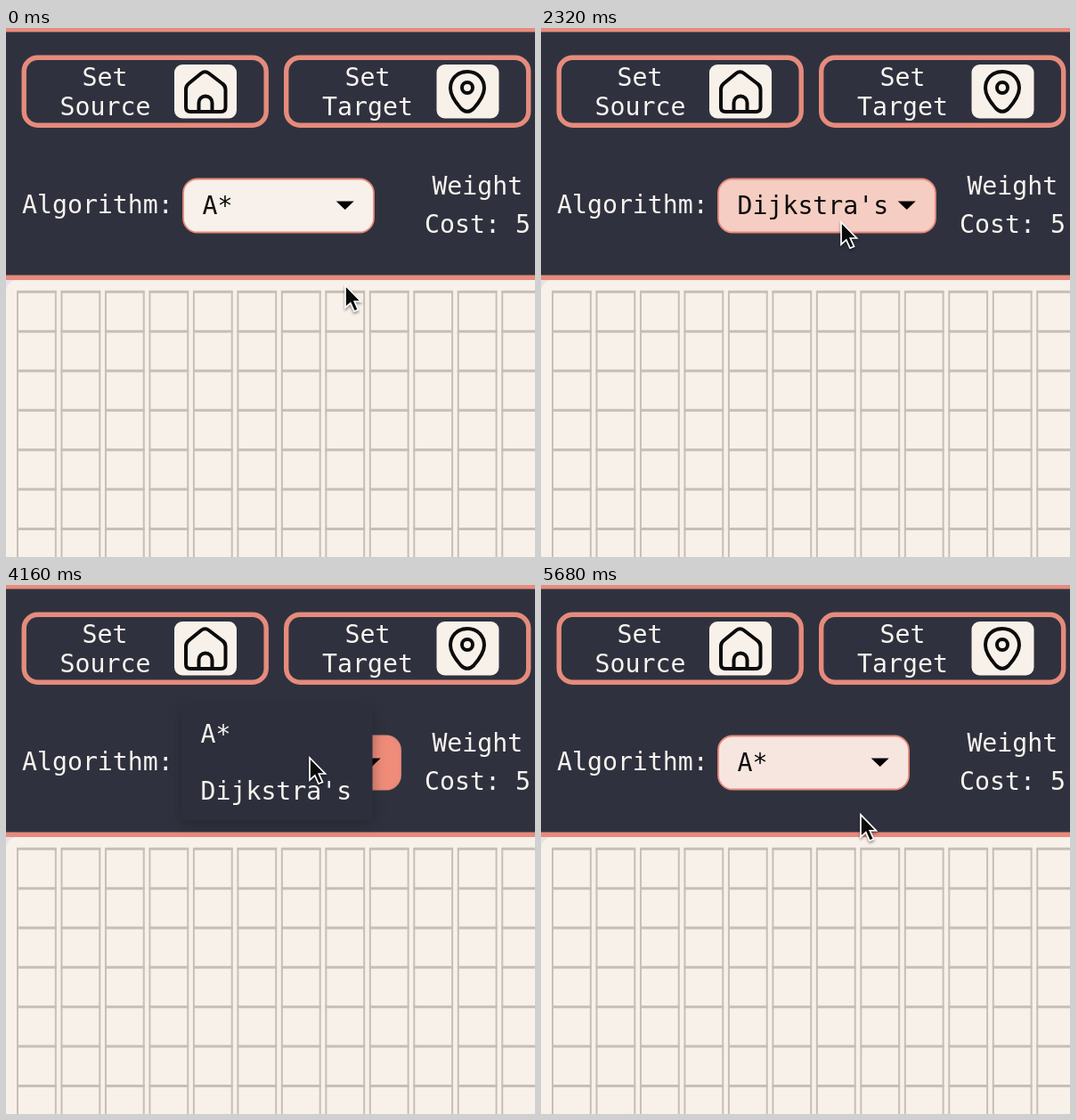
Animation, 594 px wide and 594 px high, one loop 5760 ms. Source, as an HTML page:

```html
<!DOCTYPE html>
<html lang="en">
<head>
<meta charset="utf-8">
<title>Algorithm picker</title>
<style>
  html, body { margin: 0; width: 100%; height: 100%; overflow: hidden; background: #2f323e; }
  svg { display: block; width: 100vw; height: 100vh; }
  text { font: 28.2px "DejaVu Sans Mono", monospace; fill: #f8f3ef; white-space: pre; }
  .middle { text-anchor: middle; }
  .button { fill: none; stroke: #e68b7c; stroke-width: 5.4; }
  .icon { fill: none; stroke: #0b0b0b; stroke-width: 4; stroke-linejoin: round; stroke-linecap: round; }
  .cream { fill: #f8f1ea; }
  .line { fill: #e88b7c; }
  #menu { filter: drop-shadow(0 4px 7px rgba(20, 22, 32, .4)); }
  #cursor { filter: drop-shadow(0 2px 1.5px rgba(0, 0, 0, .4)); }
</style>
</head>
<body>
<svg viewBox="0 0 594 594">
  <defs>
    <g id="frame">
      <rect class="button" x="20.2" y="33.2" width="272" height="76" rx="15.5"/>
      <rect class="cream" x="189" y="41" width="70" height="60.5" rx="9"/>
    </g>
  </defs>
  <rect width="594" height="594" fill="#2f323e"/>
  <rect class="line" width="594" height="4.5"/>
  <rect class="line" y="277.5" width="594" height="6"/>

  <use href="#frame"/>
  <text class="middle" x="111" y="64.5">Set</text>
  <text class="middle" x="111.5" y="98">Source</text>
  <path class="icon" d="M202 89V69q0-4 3-6.5L219 51q4.500-3.500 9 0L243 62.500q3.500 2.500 3.500 6.500V89q0 5-5 5H207q-5 0-5-5Z M216.500 94V84a7.500 7.500 0 0 1 15 0V94"/>

  <use href="#frame" x="294.5"/>
  <text class="middle" x="406" y="64.5">Set</text>
  <text class="middle" x="406" y="98">Target</text>
  <path class="icon" d="M518 49C506 49 499 58 499 67.5C499 77 507 86 511 90.500Q518 97 525 90.500C529 86 537 77 537 67.500C537 58 530 49 518 49Z"/>
  <circle class="icon" cx="518" cy="67" r="6"/>

  <text x="18" y="207.5">Algorithm:</text>
  <text class="middle" x="529.3" y="187">Weight</text>
  <text class="middle" x="529.5" y="229.5">Cost: 5</text>

  <rect y="283" width="20" height="20" fill="#e6e2ea"/>
  <rect class="cream" y="283" width="620" height="330" rx="13"/>
  <path id="verticals" stroke="#c6beb7" stroke-width="2"/>
  <path id="horizontals" stroke="#c6beb7" stroke-width="3"/>

  <rect id="select" x="199" y="169.5" height="60" rx="16" stroke="#e6897b" stroke-width="1.8"/>
  <text id="value" x="220.5" y="208.5" style="fill:#0b0b0b"></text>
  <path id="caret" d="M-43.3 194.500h20l-10 9.500Z"/>

  <g id="menu">
    <rect x="197" y="135" width="214.5" height="129" fill="#2d303c"/>
    <rect id="highlight" x="197" width="214.5" height="64.5" fill="#f08b79"/>
    <text x="218.5" y="176.5">A*</text>
    <text x="218.5" y="240.5">Dijkstra's</text>
  </g>
  <path id="cursor" d="M1 2V27L6.800 21.800L11 31.200L15.500 29.300L11.300 20H18.500Z" fill="#0b0b0b" stroke="#fff" stroke-width="1.7"/>
</svg>
<script>
const LOOP = 5760, STEP = 80, FADE = 400, HOVER_DELAY = 400;
const CREAM = [248, 240, 234], SALMON = [239, 139, 121];
const ROW_SPLIT = 199.5;
const $ = id => document.getElementById(id);
const clamp = v => Math.min(1, Math.max(0, v));

const easeIn = u => u * u;
const easeOut = u => 1 - (1 - u) ** 2;
const easeInOut = u => u * u * (3 - 2 * u);

// Each stop is reached at its time with the given easing.
const stops = [
  { at: 0, x: 380, y: 287 },
  { at: 640, x: 346, y: 194, ease: easeOut },
  { at: 1280, x: 344, y: 201, ease: easeInOut },
  { at: 1600, x: 332, y: 206, ease: easeInOut },
  { at: 2320, x: 336, y: 216, ease: easeIn },
  { at: 3200, x: 400, y: 250, ease: easeInOut },
  { at: 4160, x: 340, y: 192, ease: easeInOut },
  { at: 5200, x: 297, y: 170, ease: easeInOut },
  { at: LOOP, x: 380, y: 287, ease: easeIn }
];
const hovers = [[160, 880], [2180, 2700], [3600, 4320], [5030, 5320]];
const menus = [[800, 1920], [3920, 4960]];

function pointerAt(t) {
  const i = stops.findIndex(stop => stop.at > t);
  const a = stops[i - 1], b = stops[i];
  const u = b.ease((t - a.at) / (b.at - a.at));
  return { x: a.x + (b.x - a.x) * u, y: a.y + (b.y - a.y) * u };
}

const tintAt = t => hovers.reduce((sum, [enter, leave]) =>
  sum + clamp((t - enter) / FADE) - clamp((t - leave) / FADE), 0);

function drawGrid() {
  let vertical = "", horizontal = "";
  for (let col = 0; col < 12; col++) {
    const x = 13 + col * 49.48;
    vertical += `M${x} 295.5V594M${x + 42.8} 295.5V594`;
    for (let row = 0; row < 7; row++)
      horizontal += `M${x - 1} ${296.3 + row * 44.35}h44.8`;
  }
  $("verticals").setAttribute("d", vertical);
  $("horizontals").setAttribute("d", horizontal);
}

function render(t) {
  const { x, y } = pointerAt(t);
  const tint = clamp(tintAt(t));
  const menu = menus.find(([opens, closes]) => t >= opens && t < closes);
  const dijkstra = t >= menus[0][1] && t < menus[1][1];
  const right = dijkstra ? 444 : 414;

  $("cursor").setAttribute("transform", `translate(${x} ${y})`);
  $("select").setAttribute("width", right - 200);
  $("select").setAttribute("fill", `rgb(${CREAM.map((c, i) => c + (SALMON[i] - c) * tint)})`);
  $("caret").setAttribute("transform", `translate(${right})`);
  $("value").textContent = dijkstra ? "Dijkstra's" : "A*";
  $("menu").style.display = menu ? "" : "none";
  $("highlight").style.display = menu && t >= menu[0] + HOVER_DELAY ? "" : "none";
  $("highlight").setAttribute("y", y > ROW_SPLIT ? ROW_SPLIT : 135);
}

const start = performance.now();
function tick() {
  const t = (performance.now() - start) % LOOP;
  render(Math.floor(t / STEP) * STEP);
  requestAnimationFrame(tick);
}
drawGrid();
render(0);
requestAnimationFrame(tick);
</script>
</body>
</html>
```
